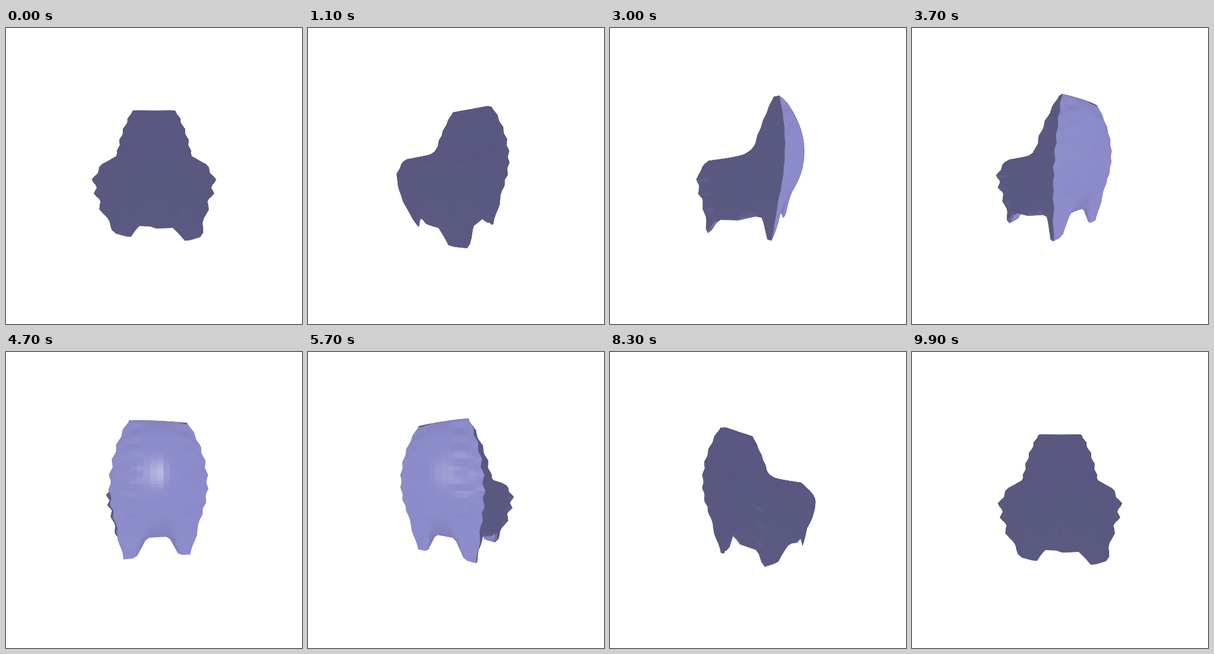
Write an HTML page with a canvas that moves like this. It is 512 px wide and 512 px high and loops after 10 s.

```html
<!DOCTYPE html>
<html>
<head>
<meta charset="utf-8">
<style>
html, body { margin: 0; width: 100%; height: 100%; overflow: hidden; background: #fff; }
canvas { display: block; }
</style>
</head>
<body>
<canvas id="stage" width="512" height="512"></canvas>
<script>
const ctx = document.getElementById('stage').getContext('2d');
const DIST = 305, TILT = 0.14, STEPS = 99;
const PER_ROW = 22, PER_SIDE = 8, TOOTH = 20;

const clamp = (x, a = 0, b = 1) => Math.min(b, Math.max(a, x));
const mix = (a, b, t) => a + (b - a) * t;
const hump = (x, mid, half) => clamp(1.9 * (1 - Math.abs(x - mid) / half));
const wave = y => Math.asin(Math.cos((y - 3) * 2 * Math.PI / TOOTH)) * 2 / Math.PI;

// The tall back plate at height y
function plate(y) {
  const a = (y - 20) / 96, b = (y - 38) / 78;
  return {
    half: 68.5 - 27 * a * a,
    mid: -76 + 28 * b * b,
    edge: -58 + 14 * b * b,
    inner: -14 - 22 * clamp((y - 40) / 76)
  };
}

// The bulging seat; u: 0 front centre, 1 corner, 2 waist, 3 joint with the plate
function seatBody(u, y, joint) {
  const drop = (y < 0 ? y / 65 : y / 29) ** 2;
  const corner = [83 - 22 * drop, 60 - 8 * drop], waist = [62, 8];
  if (u < 1) return [corner[0] * u, mix(94 - 28 * drop, corner[1], u * u)];
  if (u < 2) return corner.map((c, i) => mix(c, waist[i], u - 1));
  return waist.map((w, i) => mix(w, joint[i], u - 2));
}

// v: 0-1 up the seat's sides, 1-2 across its top, 2-3 up the plate, then the lid.
// u goes on from the joint: 4 plate's rear edge, 5 rear centre
function point(u, v, side) {
  if (v > 3) return [0, 116, -40];
  const body = clamp(v), top = clamp(v - 1), rise = clamp(v - 2);
  const yFront = -63 + 89 * body + 4 * top + 86 * rise;
  const yBack = -53 + 93 * body + 15 * top + 61 * rise;
  let y = mix(yFront, yBack, clamp((u - 0.6) / 2.4)), x, z;
  const { half, mid, edge, inner } = plate(y);
  if (u < 3) {
    const [bx, bz] = seatBody(u, Math.min(yFront, 26), [half - 3, inner]);
    x = mix(bx, (half - 3) * u / 3, top);
    z = mix(bz, inner, top);
  } else if (u < 4) {
    x = half - 3 * (4 - u);
    z = mix(inner, edge, u - 3);
  } else {
    const k = 5 - u;
    x = half * k;
    z = mix(mid, edge, k ** 1.6) + 0.8 * hump(k, 0.68, 0.24) * wave(y);
  }
  const rim = clamp(1 - Math.abs(u - 1) * 3) * (1 - top) + clamp(1.4 - Math.abs(u - 3.5) * 1.6);
  x *= 1 + 0.045 * rim * wave(y);
  const leg = clamp(1 - 3 * body);
  y -= leg * (21 * hump(u, 0.85, 0.45) + 32 * hump(u, 4.05, 0.62));
  const low = clamp((-40 - y) / 45) * clamp(z / 50);
  return [side * x + 5 * low, y, z + side * 6 * low];
}

const COLS = 10 * PER_SIDE, LINES = 3 * PER_ROW + 1;
const points = [];
for (let j = 0; j <= LINES; j++) {
  for (let i = 0; i < COLS; i++) {
    const u = i / PER_SIDE;
    points.push(u <= 5 ? point(u, j / PER_ROW, 1) : point(10 - u, j / PER_ROW, -1));
  }
}
const quads = [];
for (let j = 0; j < LINES; j++) {
  for (let i = 0; i < COLS; i++) {
    const a = j * COLS + i, b = j * COLS + (i + 1) % COLS;
    quads.push([a, b, b + COLS, a + COLS]);
  }
}

const sub = (a, b) => a.map((x, i) => x - b[i]);
const dot = (a, b) => a[0] * b[0] + a[1] * b[1] + a[2] * b[2];
const cross = (a, b) => [a[1] * b[2] - a[2] * b[1], a[2] * b[0] - a[0] * b[2], a[0] * b[1] - a[1] * b[0]];
const unit = a => a.map(x => x / (Math.hypot(...a) || 1));

function turn([x, y, z], angle) {
  const c = Math.cos(angle), s = Math.sin(angle);
  const depth = x * s + z * c;
  return [x * c - z * s, y * Math.cos(TILT) - depth * Math.sin(TILT),
    depth * Math.cos(TILT) + y * Math.sin(TILT)];
}

function shade(normal, light, half) {
  const diffuse = clamp(2 * dot(normal, light) - 0.8);
  const gloss = 55 * Math.pow(clamp(dot(normal, half)), 90) * Math.pow(clamp(light[2]), 8);
  const red = Math.round(90 + 51 * diffuse + gloss);
  return `rgb(${red},${red - 1},${Math.round(128 + 75 * diffuse + gloss * 0.5)})`;
}

function draw(step) {
  const angle = step / STEPS * 2 * Math.PI;
  const light = turn([0, 0, -1], angle);
  const half = unit([light[0], light[1], light[2] + 1.0001]);
  const view = points.map(p => turn(p, angle));
  const flat = view.map(([x, y, z]) => {
    const scale = DIST / (DIST - z);
    return [256 + x * scale, 256 - y * scale];
  });
  const faces = quads.map(q => {
    const [a, b, c, d] = q.map(i => view[i]);
    const mid = [0, 1, 2].map(k => (a[k] + b[k] + c[k] + d[k]) / 4);
    const toEye = sub([0, 0, DIST], mid);
    let normal = unit(cross(sub(c, a), sub(d, b)));
    if (dot(normal, toEye) < 0) normal = normal.map(x => -x);
    return { q, normal, far: Math.hypot(...toEye) };
  }).sort((a, b) => b.far - a.far);

  ctx.fillStyle = '#fff';
  ctx.fillRect(0, 0, 512, 512);
  ctx.lineWidth = 0.8;
  ctx.lineJoin = 'round';
  for (const { q, normal } of faces) {
    ctx.fillStyle = ctx.strokeStyle = shade(normal, light, half);
    ctx.beginPath();
    q.forEach(i => ctx.lineTo(...flat[i]));
    ctx.closePath();
    ctx.fill();
    ctx.stroke();
  }
}

let shown = -1;
function tick() {
  const step = Math.floor(performance.now() / 100) % (STEPS + 1);
  if (step !== shown) draw(shown = step);
  requestAnimationFrame(tick);
}
tick();
</script>
</body>
</html>
```
